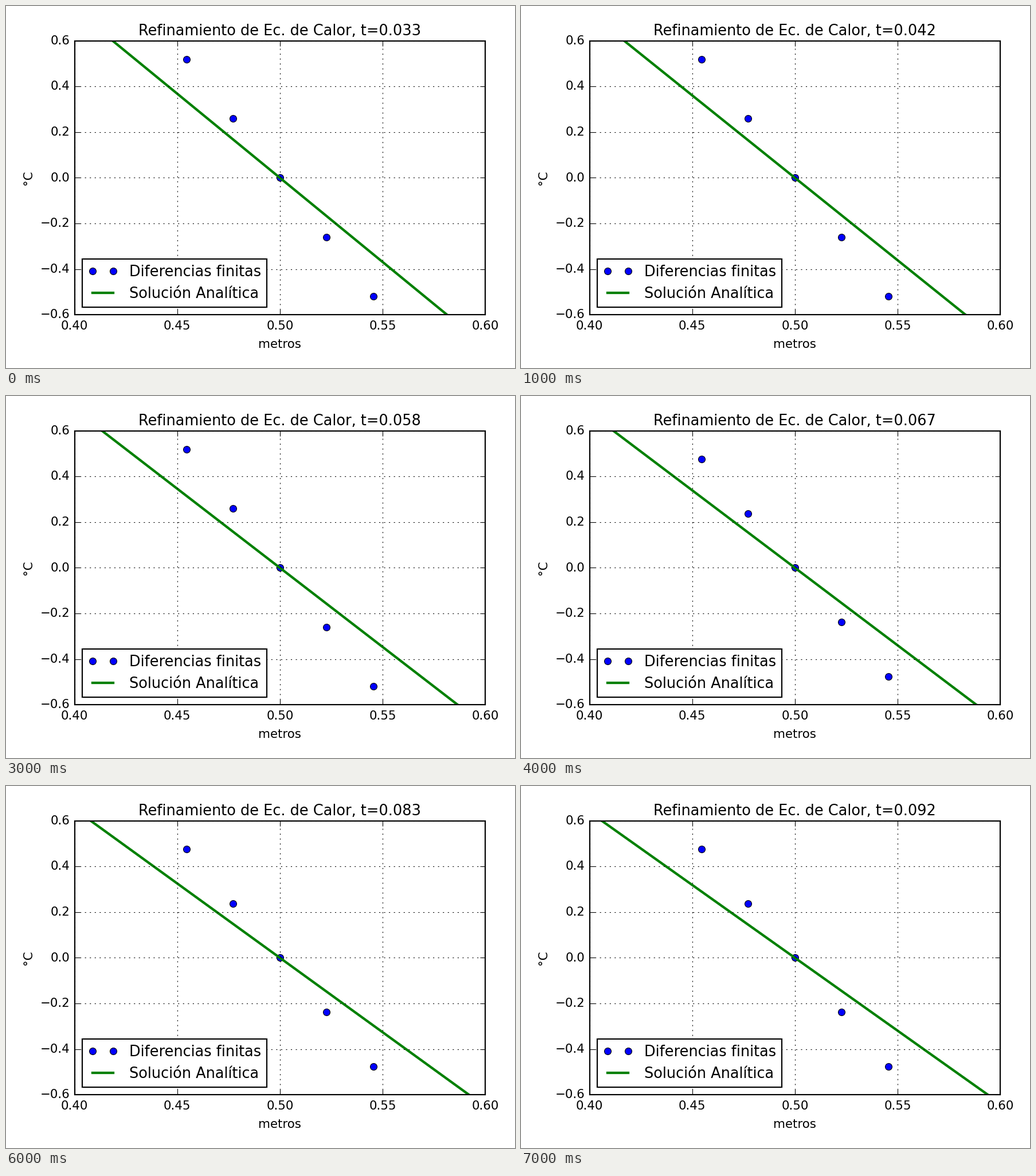
These frames come from a looping animation (888x631 px, 8 s). A matplotlib script:

```python
import numpy as np
import matplotlib.pyplot as plt
from matplotlib.animation import FuncAnimation

W, H, DPI = 888, 631, 154
LEFT, TOP, AX_W, AX_H = 119.8, 60.8, 716.1, 477.4
STEPS = 8

plt.style.use("classic")
plt.rcParams.update({
    "font.family": "DejaVu Sans",
    "font.size": 10,
    "figure.facecolor": "white",
    "savefig.dpi": "figure",
    "lines.markersize": 5.6,
    "xtick.major.pad": 4.4,
})

# The small margin keeps the pixel size from being truncated
fig = plt.figure(figsize=((W + 0.01) / DPI, (H + 0.01) / DPI), dpi=DPI)
ax = fig.add_axes([LEFT / W, 1 - (TOP + AX_H) / H, AX_W / W, AX_H / H])

nodes = 0.5 + np.arange(-2, 3) / 44
ends = np.array([0.4, 0.6])
dots, = ax.plot(nodes, 0 * nodes, "bo", label="Diferencias finitas")
line, = ax.plot(ends, 0 * ends, "g", lw=2, label="Solución Analítica")

ax.set_xlim(0.4, 0.6)
ax.set_ylim(-0.6, 0.6)
ax.set_xticks(np.linspace(0.4, 0.6, 5))
ax.set_yticks(np.linspace(-0.6, 0.6, 7))
ax.grid(True)
ax.set_xlabel("metros", labelpad=6)
ax.set_ylabel("°C", labelpad=4.7)
ax.legend(loc="lower left", labelspacing=0.46)
title = ax.set_title("", pad=4.5)


def update(i):
    t = (i + 4) / 120
    exact = 8 * np.exp(-np.pi**2 * t / 4)
    # The coarse scheme advances once every four steps
    coarse = 11.4 * 0.9177 ** (i // 4)
    line.set_ydata(exact * (0.5 - ends))
    dots.set_ydata(coarse * (0.5 - nodes))
    title.set_text(f"Refinamiento de Ec. de Calor, t={t:.3f}")
    return line, dots, title


anim = FuncAnimation(fig, update, frames=STEPS, interval=1000, repeat=True,
                     repeat_delay=0, blit=False)
plt.show()
```
